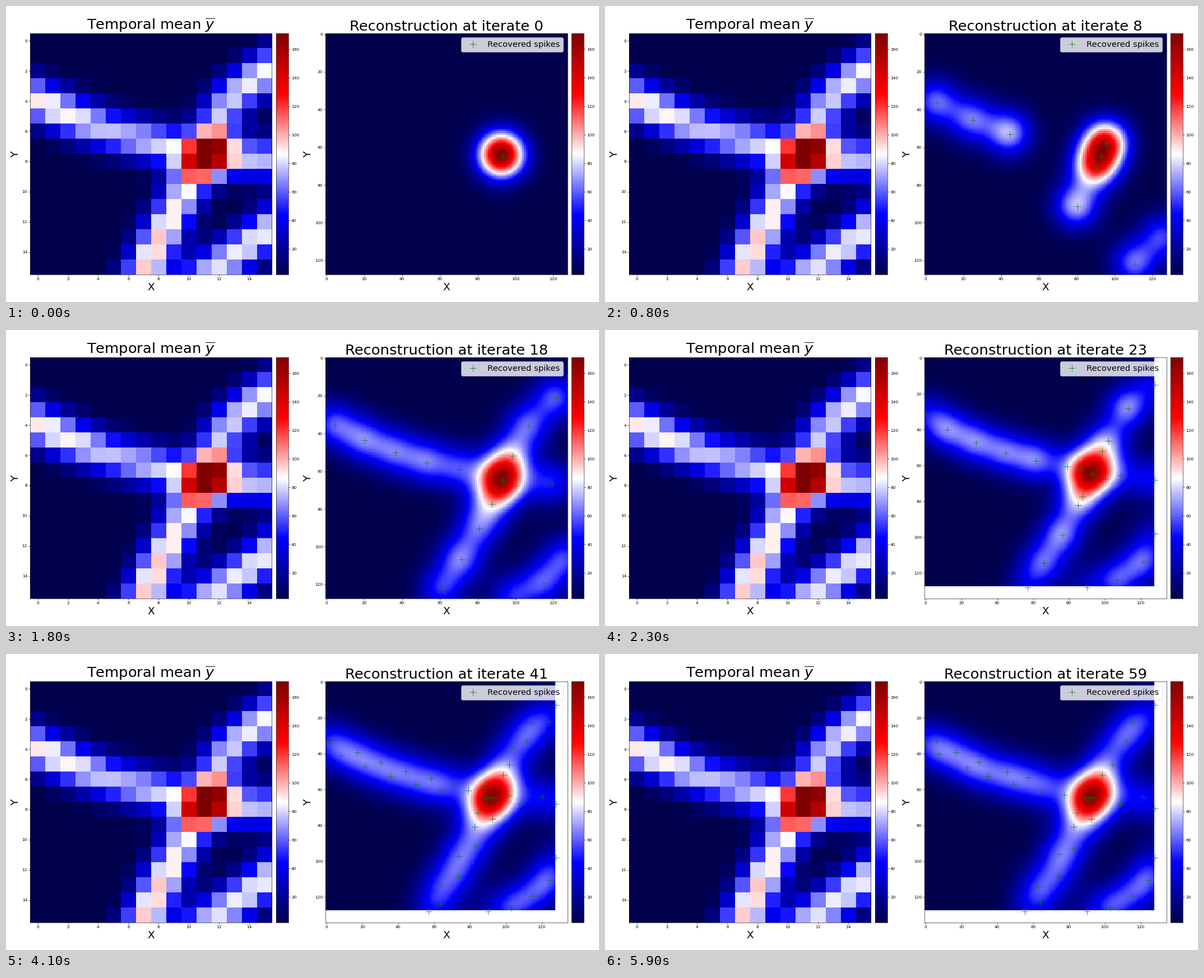
Animation of 1058 by 529 pixels, one loop 6.3 s. Source, as a matplotlib script:

```python
import numpy as np
import matplotlib.pyplot as plt
from matplotlib.animation import FuncAnimation

W, H, DPI = 1058, 529, 52.9
LAST, HOLD = 59, 4          # last iterate and how many ticks it stays
GROW = 20                   # iterate at which spikes reach the image border
SIGMA = 8.5                 # blur of one spike
SPACING, CROWDED = 21, 8.5  # widest gap along an arm, gap that causes staggering

# Observed ridges and core spots in cells: (x, y, height).
MEAN_ARMS = [
    [(-2, 3.1, 92), (0, 3.95, 92), (2, 4.95, 90), (5, 6.1, 73), (9.9, 7.3, 84)],
    [(17, 0.8, 88), (15, 2.1, 88), (13, 3.5, 82), (11.8, 5, 70), (11.5, 6.3, 75)],
    [(10.3, 8.8, 70), (9.2, 11, 92), (8.1, 13, 97), (6.2, 17, 97)],
    [(12.3, 7.7, 72), (14, 7.85, 76), (17, 7.85, 80)],
    [(17, 11, 86), (14.5, 13.1, 86), (12, 14.9, 84), (9.5, 16.3, 70)],
]
MEAN_CORE = [(11.5, 7.3, 130), (10.6, 8.2, 78)]

# Recovered structure: each arm is a path with a height at either end.
ARMS = {
    "L": ([(-3, 31), (12, 40), (28, 47), (45, 53), (60, 57), (79, 60.5)], 64, 58),
    "S": ([(85, 82), (79, 94), (72, 106), (65, 116), (57, 131)], 66, 52),
    "U": ([(130, 15), (117.5, 24), (109, 31.5), (102, 46)], 52, 60),
    "M": ([(109, 65.5), (131, 68)], 60, 40),
    "R": ([(130, 98), (124, 112), (114, 120), (104, 126), (90, 130)], 58, 50),
}
CENTRE = np.array([93, 64.5])
LONG, SHORT = np.array([5.5, -12.8]), np.array([7, 3])   # half axes of the core

# Which part gains a spike at each iterate (C is the core).
ORDER = "CLCLLC" "RSRSULC" "LSRCMU" "SRULMRLUCLSLC" "LUSLCLUMLS"


def gauss(grid, centres, sigma):
    return np.exp(-0.5 * ((grid[:, None] - centres) / sigma) ** 2)


def render(grid, x, y, weight, sigma=SIGMA):
    return (gauss(grid, y, sigma) * weight) @ gauss(grid, x, sigma).T


def structure(grid, arms, spots, sigma):
    """Blurred ridges along the arms plus the spots of the core."""
    img = render(grid, *np.array(spots, float).T, sigma)
    for arm in arms:
        t = np.linspace(0, len(arm) - 1, 240)
        x, y, h = (np.interp(t, np.arange(len(arm)), c) for c in zip(*arm))
        step = np.hypot(np.gradient(x), np.gradient(y))
        img += render(grid, x, y, h * step / (sigma * np.sqrt(2 * np.pi)), sigma)
    return img


def goal_structure(grid):
    arms = [[(x, y, h) for (x, y), h in zip(path, np.linspace(h0, h1, len(path)))]
            for path, h0, h1 in ARMS.values()]
    ends = [(*(CENTRE + side * LONG), 62) for side in (0.7, -0.7)]
    return structure(grid, arms, [(*CENTRE, 90)] + ends, SIGMA)


def on_arm(path, n, k):
    """Spread n spikes along a path, staggering them once they are crowded."""
    px, py = np.array(path, float).T
    arc = np.append(0, np.cumsum(np.hypot(np.diff(px), np.diff(py))))
    gap, j = arc[-1] / n, np.arange(n)
    if k >= GROW and n > 1:
        s = np.linspace(0, arc[-1], n)
    else:
        s = (j + 0.5) * min(SPACING, gap)

    def at(s):
        return np.array([np.interp(s, arc, px), np.interp(s, arc, py)])

    if gap < CROWDED:
        s = s + 1.5 * np.sin(2 * j) * np.clip((k - 41) / 18, 0, 1)
        dx, dy = at(s + 1) - at(s)
        pts = at(s) + 2.7 * (-1.0) ** j * np.array([-dy, dx])
    else:
        pts = at(s)
    return np.clip(pts, 0, 128).T


def in_core(n):
    """One spike at the centre, up to five on an ellipse, the rest in the middle."""
    ring = min(n - 1, 5)
    scale = min(1, (n - 1) / 4)
    pts = [CENTRE - (2 * i, 0) for i in range(n - ring)]
    for a in 2 * np.pi * np.arange(ring) / max(ring, 1):
        pts.append(CENTRE + scale * (np.cos(a) * LONG + np.sin(a) * SHORT))
    return np.array(pts)


def spikes(k):
    born = ORDER[:k + 1]
    groups = [in_core(born.count("C"))]
    for name, (path, *_) in ARMS.items():
        if name in born:
            groups.append(on_arm(path, born.count(name), k))
    return np.concatenate(groups).T


FINE = np.arange(128) + 0.5
COARSE = FINE[1::4]
GOAL = goal_structure(COARSE)


def fit(x, y):
    """Non-negative least-squares weights by multiplicative updates."""
    gx, gy = gauss(COARSE, x, SIGMA), gauss(COARSE, y, SIGMA)
    gram = (gx.T @ gx) * (gy.T @ gy)
    proj = np.sum(gy * (GOAL @ gx), axis=0)
    weight = np.full(len(x), 30.0)
    for _ in range(300):
        weight *= proj / (gram @ weight)
    return weight


# ---- Figure ----
fig = plt.figure(figsize=(20, 10), dpi=DPI)
TOP, SIZE = 48.9, 431.2


def box(x, width):
    return fig.add_axes([x / W, 1 - (TOP + SIZE) / H, width / W, SIZE / H])


def panel(x, img):
    ax = box(x, SIZE)
    im = ax.imshow(img, cmap="seismic", interpolation="nearest", aspect="auto")
    ax.set_xlabel("X", fontsize=25)
    ax.set_ylabel("Y", fontsize=25)
    return ax, im, box(x + SIZE + 7.9, SIZE / 20)


mean = structure(np.arange(16), MEAN_ARMS, MEAN_CORE, 1.0)
ax_mean, im_mean, bar_mean = panel(43.2, mean)
im_mean.set_clim(1.95, 171.2)
ax_mean.set_title(r"Temporal mean $\overline{y}$", fontsize=35)

ax_rec, im_rec, bar_rec = panel(570.4, np.zeros((128, 128)))
title = ax_rec.set_title("", fontsize=35)
marks, = ax_rec.plot([], [], "g+", ms=15, label="Recovered spikes")
ax_rec.legend(loc="upper right", fontsize=20)

for bar in (bar_mean, bar_rec):
    fig.colorbar(im_mean, cax=bar)


def update(i):
    k = min(i, LAST)
    x, y = spikes(k)
    img = render(FINE, x, y, fit(x, y))
    im_rec.set_data(img)
    im_rec.set_clim(img.min(), img.max())
    marks.set_data(x, y)
    edge = 134.4 if k >= GROW else 127.5
    ax_rec.set_xlim(-0.5, edge)
    ax_rec.set_ylim(edge, -0.5)
    title.set_text(f"Reconstruction at iterate {k}")
    return im_rec, marks, title


anim = FuncAnimation(fig, update, frames=LAST + HOLD, interval=100,
                     init_func=lambda: update(0), repeat=True, repeat_delay=0)
plt.show()
```
